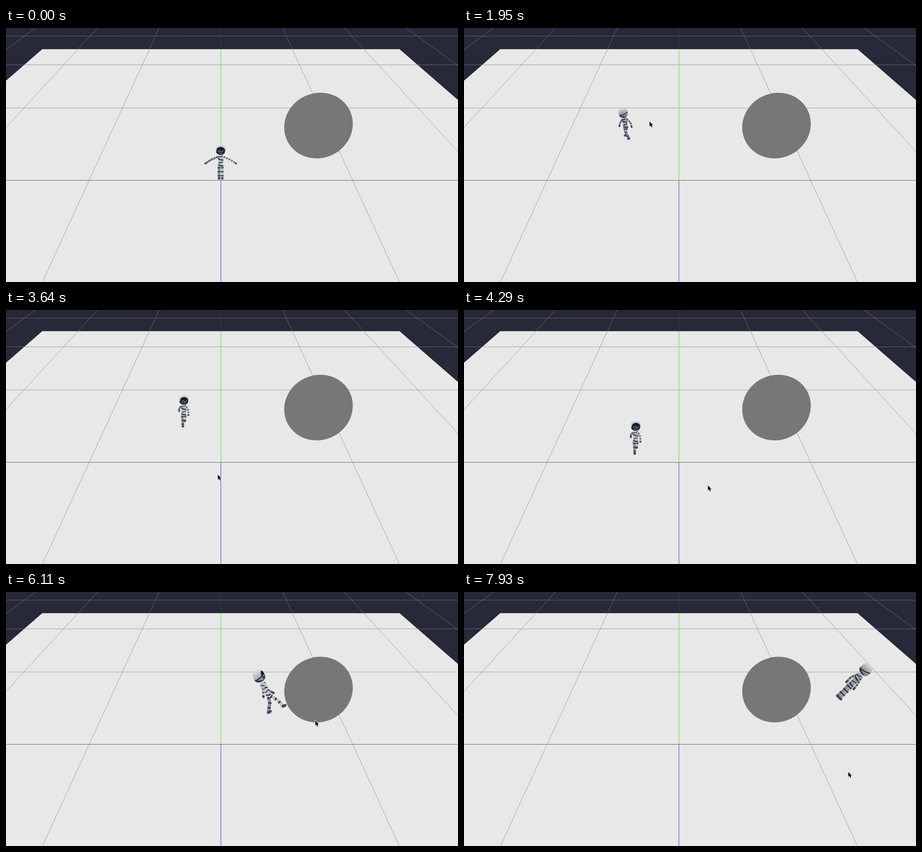
An HTML page with a canvas for the animation above (8000 ms loop, 998x561 px).

```html
<!DOCTYPE html>
<html lang="en">
<head>
<meta charset="utf-8">
<title>Robot runner</title>
<style>
  html, body { margin: 0; width: 100%; height: 100%; overflow: hidden; background: #272838; }
  canvas { display: block; }
</style>
</head>
<body>
<canvas id="stage" width="998" height="561"></canvas>
<script>
const g = document.getElementById('stage').getContext('2d');
const W = 998, H = 561, MID = 474.5, LOOP = 8000, STEP = 130, GAIT = 693;
const DARK = '#252b3d';

// Perspective: width in pixels of one floor unit at a screen row, and the row at a depth.
const unit = y => 136.3 + 0.4594 * y;
const row = z => (1 / (0.003438 + 0.00116 * z) - 136.3) / 0.4594;
const railX = (k, y) => MID + k * unit(y);

// Hip position, turn in quarter circles (0 faces the camera, -1 left, -2 away).
const key = (t, x, y, turn, mouse, more) =>
  ({ t, x, y, turn, mouse, lean: 0, near: 1, stride: 0.75, idle: 0, ...more });

const still = { stride: 0, idle: 1 };
const keys = [
  key(0, 474, 304, 0, [290, 190], still),
  key(390, 474, 304, 0, [290, 190], still),
  key(1950, 357, 219, -1.7, [409, 206], { lean: -0.17 }),
  key(2860, 409, 160, -2.5, [382, 335]),
  key(4290, 379, 290, -3.95, [538, 387]),
  key(5330, 479, 306, -3, [586, 335], { lean: 0.05, stride: 0.95 }),
  key(7020, 698, 138, -3.15, [795, 224], { lean: -1.08, near: 2.05, stride: 0.3 }),
  key(7930, 854, 205, -2.4, [848, 397], { lean: 0.78, near: 1.5, stride: 0.25 })
];

const mix = (a, b, u) => a + (b - a) * u;

function stateAt(t) {
  let i = 0;
  while (i < keys.length - 2 && t >= keys[i + 1].t) i++;
  const a = keys[i], b = keys[i + 1];
  const u = Math.min(1, (t - a.t) / (b.t - a.t));
  const s = { mouse: a.mouse.map((v, n) => mix(v, b.mouse[n], u)) };
  for (const name of ['x', 'y', 'lean', 'near', 'stride', 'idle']) s[name] = mix(a[name], b[name], u);
  s.turn = mix(a.turn, b.turn, Math.min(1, u * 2.5));
  s.size = s.near * (unit(s.y + 28) / 289) ** 0.6;
  return s;
}

function path(points) {
  g.beginPath();
  points.forEach(p => g.lineTo(...p));
}

function line(x1, y1, x2, y2, color, width = 1) {
  g.strokeStyle = color;
  g.lineWidth = width;
  path([[x1, y1], [x2, y2]]);
  g.stroke();
}

function shape(points, color) {
  path(points);
  g.closePath();
  g.fillStyle = color;
  g.fill();
}

function oval(x, y, rx, ry, color, tilt = 0) {
  g.fillStyle = color;
  g.beginPath();
  g.ellipse(x, y, rx, ry, tilt, 0, Math.PI * 2);
  g.fill();
}

function drawScene() {
  g.fillStyle = '#272838';
  g.fillRect(0, 0, W, H);
  const back = row(2.5);
  shape([[railX(-2.5, back), back], [railX(2.5, back), back],
    [railX(2.5, H), H], [railX(-2.5, H), H]], '#e8e8e8');

  const grid = 'rgba(128,128,128,.75)';
  for (let z = 1; z <= 3; z++) line(0, row(z), W, row(z), grid);
  for (let k = -3; k <= 3; k++) if (k) line(railX(k, 0), 0, railX(k, H), H, grid);
  line(0, 336.5, W, 336.5, '#626262');
  line(MID, 0, MID, back, '#2a4634', 1.3);
  line(MID, back, MID, 336, '#7fe37a', 1.6);
  line(MID, 337, MID, H, '#7c7cd8', 1.7);
  oval(690, 215.5, 76.7, 71.5, '#777', -0.454);
}

function limb(from, to, bend, width, color) {
  const middle = [(from[0] + to[0]) / 2 + bend, (from[1] + to[1]) / 2];
  path([from, middle, to]);
  g.lineWidth = width;
  g.lineJoin = g.lineCap = 'round';
  g.strokeStyle = color;
  g.stroke();
  g.lineCap = 'butt';
  g.strokeStyle = DARK;
  g.setLineDash([width * 0.38, width * 1.15]);
  g.lineDashOffset = -width * 0.6;
  g.stroke();
  g.setLineDash([]);
}

function bands(w, top, bottom, count, width) {
  g.strokeStyle = DARK;
  for (let i = 0; i < count; i++) {
    const y = mix(top, bottom, (i + 0.5) / count), tilt = (i % 2 ? 1 : -1) * w * 0.25;
    g.lineWidth = width * (i % 2 ? 1 : 0.7);
    g.beginPath();
    g.moveTo(-w, y - tilt);
    g.quadraticCurveTo(0, y + w * 0.4, w, y + tilt);
    g.stroke();
  }
}

function drawTorso(length, width, color) {
  const w = width / 2;
  g.save();
  path([[-w * 0.6, -length], [w * 0.6, -length], [w, -length * 0.85],
    [w * 0.7, -length * 0.3], [w * 0.8, 2], [-w * 0.8, 2],
    [-w * 0.7, -length * 0.3], [-w, -length * 0.85]]);
  g.closePath();
  g.fillStyle = color;
  g.fill();
  g.clip();
  bands(w, -length, 2, 4, width * 0.17);
  g.restore();
}

function drawHead(y, r, side, face) {
  g.save();
  g.translate(0, y);
  const shade = g.createLinearGradient(0, -r, 0, r);
  shade.addColorStop(0, '#dcdde0');
  shade.addColorStop(0.5, face < -0.3 ? '#a2a4aa' : '#b9babf');
  shade.addColorStop(1, '#747781');
  g.beginPath();
  g.roundRect(-r * 0.95, -r, r * 1.9, r * 2, r * 0.75);
  g.fillStyle = shade;
  g.fill();
  g.clip();
  bands(r, -r * 0.1, r, 2, r * 0.24);
  if (face > -0.3) {
    const x = side * r * 0.85, w = r * (0.28 + 0.58 * Math.max(0, face));
    oval(x, r * 0.2, w, r * 0.8, '#171d2b');
    oval(x, r * 0.7, w * 0.6, r * 0.2, '#3c4a35');
    g.strokeStyle = '#8f9aa6';
    g.lineWidth = r * 0.12;
    g.beginPath();
    for (let u = -0.7; u < 0.75; u += 0.1) g.lineTo(x + u * w, r * (0.3 + 0.13 * Math.sin(u * 7)));
    g.stroke();
  }
  g.restore();
}

function drawRobot(t, s) {
  const a = s.turn * Math.PI / 2, side = Math.sin(a), face = Math.cos(a), wide = Math.abs(face);
  const len = s.size, bulk = s.size ** 0.65;
  const near = face < -0.3 ? '#9c9ea5' : '#bfc0c5', far = '#898c95';
  const beat = Math.cos((t - 5330) / GAIT * Math.PI * 2);

  // End of a limb hung from a joint; a forward swing shows sideways or as depth.
  const hang = ([x, y], length, swing, spread) => {
    const reach = length * Math.sin(swing), drop = length * Math.cos(swing);
    return [
      x + reach * side + drop * Math.sin(spread),
      y + drop * Math.cos(spread) + reach * face * 0.35
    ];
  };

  const leg = (sign, color) => {
    const hip = [sign * 3.6 * bulk * wide, 0], swing = sign * beat * s.stride;
    const foot = hang(hip, 28 * len, swing, 0);
    limb(hip, foot, side * 4 * len * s.stride, 5.8 * bulk, color);
    oval(foot[0] + side * 2 * bulk, foot[1], (2.8 + 2 * Math.abs(side)) * bulk, 2.6 * bulk, '#414a5f');
  };

  const arm = (sign, color) => {
    const shoulder = [sign * 5.5 * bulk * wide, -20 * len];
    const spread = sign * mix(0.25 * wide, 1.08, s.idle);
    const swing = -sign * beat * Math.min(0.75, s.stride * 2.5);
    const hand = hang(shoulder, mix(22, 32, s.idle) * len, swing, spread);
    limb(shoulder, hand, sign * wide * 2.5 - side * 2, 4 * bulk, color);
    oval(...hand, 2.2 * bulk, 2.2 * bulk, '#3c4458');
  };

  g.save();
  g.translate(s.x, s.y);
  g.rotate(s.lean);
  leg(-1, far);
  arm(-1, far);
  leg(1, near);
  drawTorso(24 * len, (11 + 3 * wide) * bulk, near);
  arm(1, near);
  drawHead(-35 * len, 11 * bulk, side, face);
  g.restore();
}

function drawCursor([x, y]) {
  const arrow = [[0.5, 0.5], [0.5, 11.5], [3, 9.2], [5, 13.5], [7, 12.6], [5.2, 8.5], [8.6, 8.5]];
  g.save();
  g.translate(x, y);
  path(arrow);
  g.closePath();
  g.lineJoin = 'round';
  g.lineWidth = 1.6;
  g.strokeStyle = '#fff';
  g.stroke();
  shape(arrow, '#0b0b0b');
  g.restore();
}

const start = performance.now();
function draw() {
  const now = Math.max(0, performance.now() - start) % LOOP;
  const t = Math.floor(now / STEP) * STEP;
  const state = stateAt(t);
  drawScene();
  drawRobot(t, state);
  if (t >= 780) drawCursor(state.mouse);
  requestAnimationFrame(draw);
}
draw();
</script>
</body>
</html>
```
